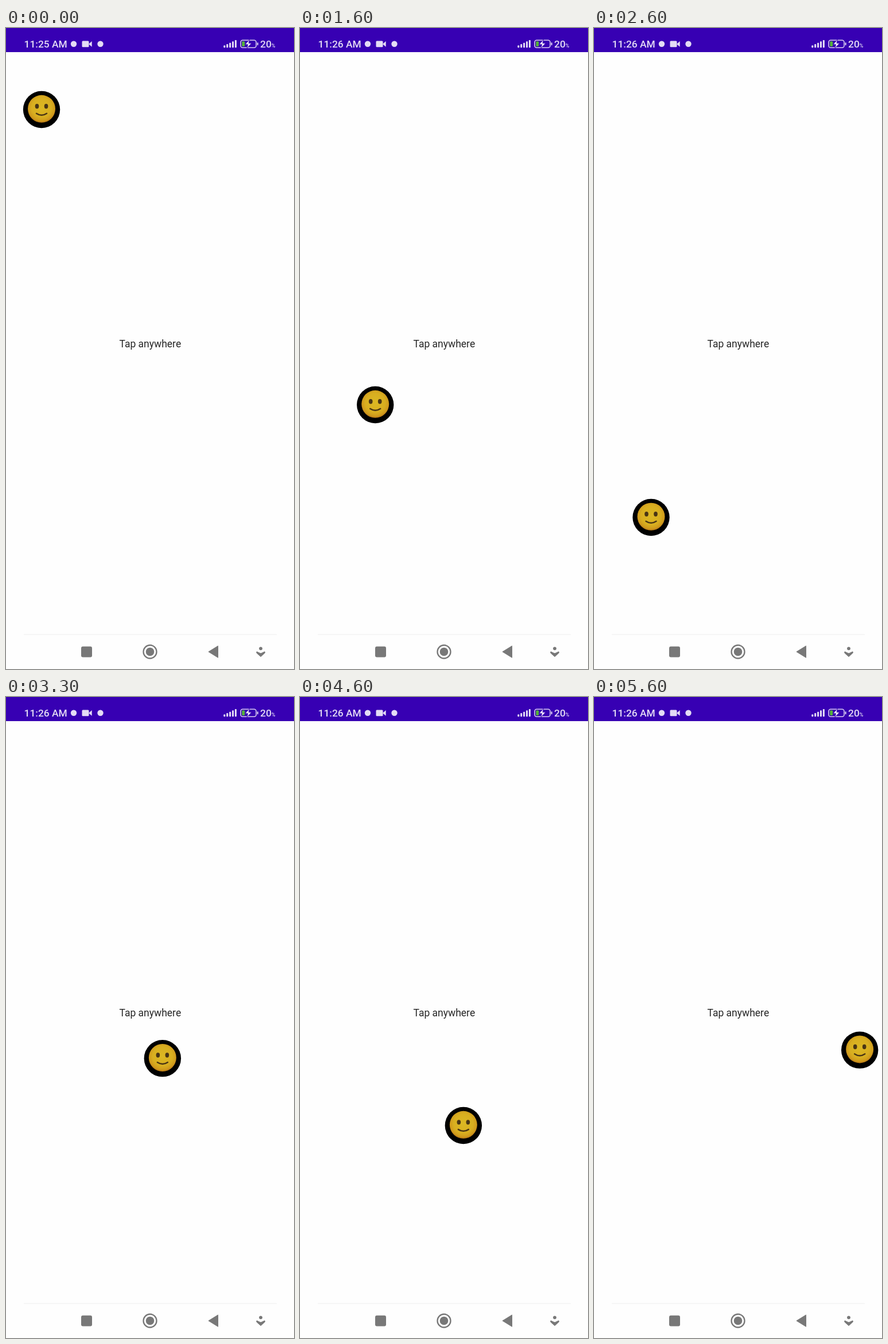
Write an HTML page that moves like this. It is 502 by 1116 pixels and loops after 5700 ms.

```html
<!DOCTYPE html>
<html lang="en">
<head>
<meta charset="utf-8">
<title>Tap anywhere</title>
<style>
  html, body { margin: 0; width: 100%; height: 100%; overflow: hidden; background: #fefefe; }
  svg { display: block; width: 502px; height: 1116px; }
  text { font-family: Roboto, "Noto Sans", sans-serif; }
</style>
</head>
<body>
<svg viewBox="0 0 502 1116">
  <defs>
    <radialGradient id="skin" cx="50%" cy="45%" r="55%">
      <stop offset="0" stop-color="#dcb823"/>
      <stop offset=".65" stop-color="#d8ae20"/>
      <stop offset=".88" stop-color="#d09a1c"/>
      <stop offset="1" stop-color="#b87716"/>
    </radialGradient>
  </defs>
  <rect width="502" height="1116" fill="#fefefe"/>

  <!-- status bar -->
  <rect width="502" height="42" fill="#3700b3"/>
  <g fill="#e4dcf5">
    <text id="clock" x="31.5" y="34" font-size="17.4" font-weight="500">11:25 AM</text>
    <circle cx="118" cy="27.7" r="5.2"/>
    <circle cx="164.5" cy="27.7" r="5.2"/>
    <rect x="132.5" y="22.5" width="12" height="10.8" rx="1.5"/>
    <path d="M144 27.9L149.7 23V32.8Z"/>
    <g id="bars"></g>
    <rect x="437.6" y="25.3" width="2" height="5" rx="1"/>
    <text x="443" y="34" font-size="17.4" font-weight="500">20</text>
    <text x="462.8" y="34" font-size="9" font-weight="500">%</text>
  </g>
  <rect x="409" y="21.2" width="27" height="13" rx="3.5" fill="none" stroke="#d8cdf0" stroke-width="1.6"/>
  <rect x="411.2" y="23.3" width="5" height="8.8" rx="1" fill="#55b03c"/>
  <path d="M424.5 20L416.8 28.8H421.6L419.8 35.4L428 26.4H423Z" fill="#f0eafa" stroke="#3700b3" stroke-width=".8"/>

  <text x="251.3" y="556" font-size="17.5" text-anchor="middle" fill="#262626">Tap anywhere</text>

  <!-- navigation bar -->
  <rect x="31" y="1055.5" width="441" height="1" fill="#f0f0f0"/>
  <g fill="#787878">
    <rect x="131" y="1076.8" width="19" height="18.6" rx="3"/>
    <circle cx="251" cy="1086" r="11.5" fill="none" stroke="#787878" stroke-width="2.3"/>
    <circle cx="251" cy="1086" r="7.3"/>
    <path d="M353 1086L369.5 1075.8V1096.2Z" stroke="#787878" stroke-linejoin="round"/>
    <circle cx="444" cy="1080.3" r="2.9"/>
    <path d="M437 1085.8L444 1089L451 1085.8L451.3 1088L444 1094.5L436.7 1088Z" stroke="#787878" stroke-linejoin="round"/>
  </g>

  <g id="ball">
    <circle r="32.2"/>
    <circle cy="-1.2" r="24" fill="url(#skin)"/>
    <g fill="#493515">
      <ellipse cx="-8" cy="-5.7" rx="3.3" ry="4.2"/>
      <ellipse cx="8" cy="-5.7" rx="3.3" ry="4.2"/>
    </g>
    <path d="M-9 6.8Q0 12.8 9 6.8" fill="none" stroke="#493515" stroke-width="2.5" stroke-linecap="round"/>
  </g>
</svg>
<script>
const LOOP = 5700, STEP = 100;
const START = { x: 62, y: 142 };

// Each tap: time in ms, where the ball heads, spring rate on each axis (1/s)
const taps = [
  { t: 830,  x: 419,   y: 155.1, wx: 14,   wy: 14 },
  { t: 1380, x: 99.5,  y: 852,   wx: 17.7, wy: 11.5 },
  { t: 2630, x: 274.5, y: 629,   wx: 10,   wy: 14.2 },
  { t: 3380, x: 430,   y: 454,   wx: 14,   wy: 14 },
  { t: 4380, x: 235,   y: 800,   wx: 12.1, wy: 15.1 },
  { t: 4720, x: 97,    y: 739,   wx: 22,   wy: 22 },
  { t: 4950, x: 463.6, y: 614.5, wx: 14,   wy: 14 }
];

const ball = document.getElementById("ball");
const clock = document.getElementById("clock");

document.getElementById("bars").innerHTML = [4, 6.3, 8.6, 11, 13.4].map((h, i) =>
  `<rect x="${379.3 + i * 4.9}" y="${34.3 - h}" width="3" height="${h}" rx="1"/>`).join("");

// Critically damped spring from rest
function ease(from, to, w, ms) {
  const u = w * ms / 1000;
  return to + (from - to) * (1 + u) * Math.exp(-u);
}

function place(t) {
  let p = START;
  taps.forEach((tap, i) => {
    if (t < tap.t) return;
    const next = taps[i + 1];
    const ms = (next ? Math.min(t, next.t) : t) - tap.t;
    p = { x: ease(p.x, tap.x, tap.wx, ms), y: ease(p.y, tap.y, tap.wy, ms) };
  });
  return p;
}

function draw(now) {
  const t = Math.floor((now % LOOP) / STEP) * STEP;
  const p = place(t);
  ball.setAttribute("transform", `translate(${p.x.toFixed(2)} ${p.y.toFixed(2)})`);
  clock.textContent = t < 1400 ? "11:25 AM" : "11:26 AM";
}

let origin = null;
function tick(now) {
  if (origin === null) origin = now;
  draw(now - origin);
  requestAnimationFrame(tick);
}
draw(0);
requestAnimationFrame(tick);
</script>
</body>
</html>
```
